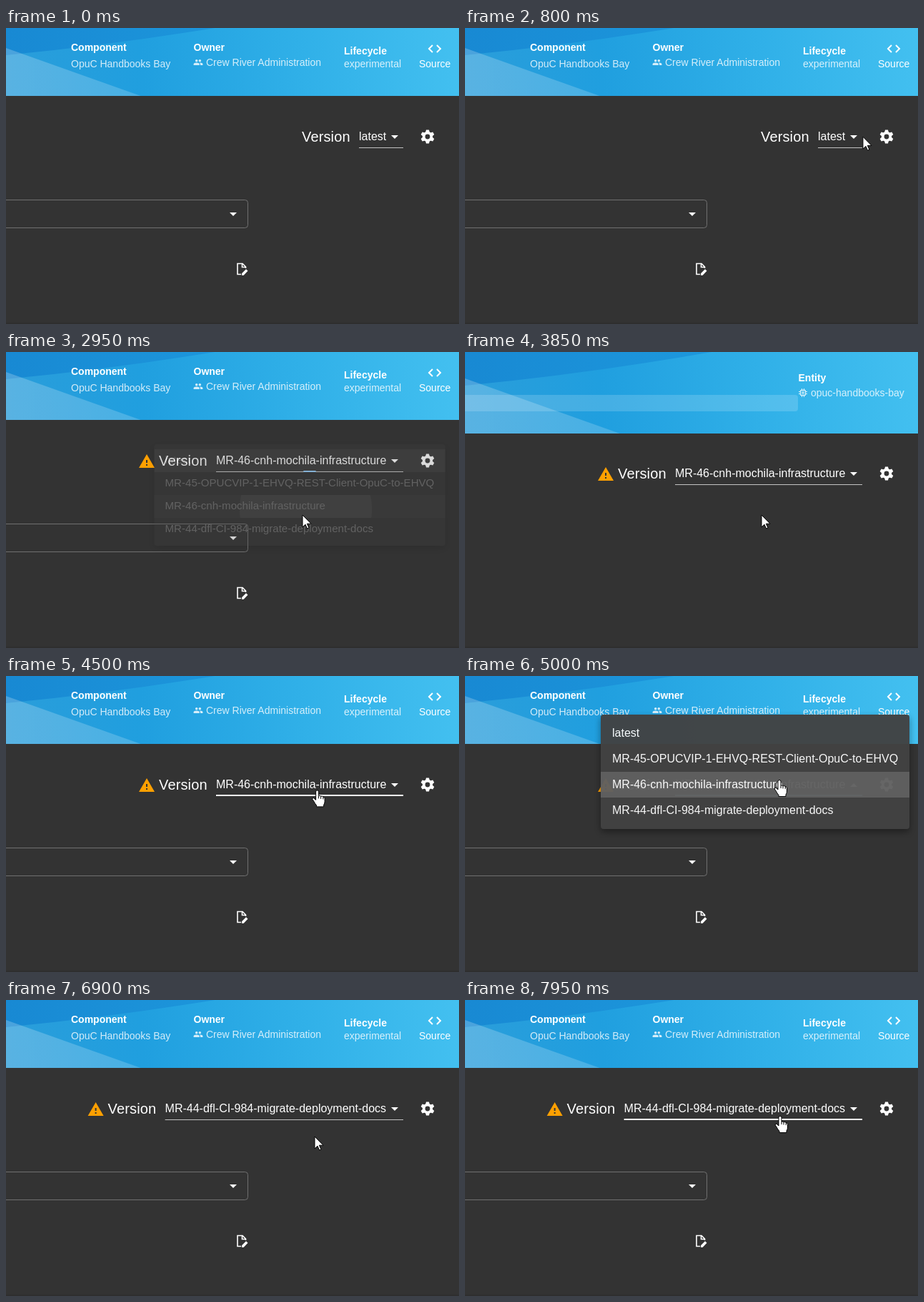
An HTML page for the animation above (8000 ms loop, 634x414 px).

```html
<!DOCTYPE html>
<html lang="en">
<head>
<meta charset="utf-8">
<title>Version selector</title>
<style>
  html, body { margin: 0; width: 100%; height: 100%; overflow: hidden; background: #333; }
  svg { display: block; width: 634px; height: 414px; }
  text { font: 14px "Liberation Sans", sans-serif; fill: #fff; white-space: pre; }
  .label { font-weight: bold; }
  .soft { opacity: .8; }
  .version { font-size: 20px; letter-spacing: .15px; }
  .item { font-size: 16px; }
  .paper { filter: drop-shadow(0 4px 5px rgba(0, 0, 0, .4)); }
</style>
</head>
<body>
<svg viewBox="0 0 634 414">
  <defs>
    <linearGradient id="deep"><stop stop-color="#1889d3"/><stop offset="1" stop-color="#22a5e5"/></linearGradient>
    <linearGradient id="wave" gradientUnits="userSpaceOnUse" x1="0" y1="60" x2="634" y2="10">
      <stop stop-color="#2a9dda"/><stop offset=".3" stop-color="#209fdf"/>
      <stop offset=".65" stop-color="#30b0e8"/><stop offset="1" stop-color="#43c0f0"/>
    </linearGradient>
    <linearGradient id="slope"><stop stop-color="#fff" stop-opacity=".22"/><stop offset="1" stop-color="#fff" stop-opacity=".16"/></linearGradient>
    <clipPath id="rowClip"><rect id="rowBox" x="190" width="432" height="36"/></clipPath>
    <path id="caret" d="M-5-2.5H5L0 2.5Z" fill="#fff"/>
  </defs>

  <rect width="634" height="120" fill="url(#deep)"/>
  <g id="waves">
    <path d="M0 38Q172 21.5 345-9H634V130H0Z" fill="url(#wave)"/>
    <path d="M0 28L281 128H0Z" fill="url(#slope)"/>
  </g>

  <g id="fullHeader">
    <text class="label" x="91" y="32">Component</text>
    <text class="soft" x="91" y="55">OpuC Handbooks Bay</text>
    <text class="label" x="262.5" y="32">Owner</text>
    <g class="soft" fill="#fff" transform="translate(262 41) scale(.583)">
      <circle cx="8" cy="8" r="3"/><circle cx="16" cy="8" r="3"/>
      <path d="M1 19V16.5Q1 13 8 13T15 16.5V19ZM16 13Q23 13 23 16.5V19H17V16.5Q17 14.6 15 13Z"/>
    </g>
    <text class="soft" x="280" y="53">Crew River Administration</text>
    <text class="label" x="473" y="37">Lifecycle</text>
    <text class="soft" x="473" y="55">experimental</text>
    <path d="M597 24L592 29L597 34M603 24L608 29L603 34" fill="none" stroke="#fff" stroke-width="2"/>
    <text x="578" y="55">Source</text>
  </g>

  <g id="loadHeader">
    <rect x="-8" y="60" width="474" height="23" rx="4" fill="#fff" opacity=".16"/>
    <text class="label" x="466.500" y="41">Entity</text>
    <g class="soft" fill="none" stroke="#fff">
      <rect x="469.500" y="53.500" width="7" height="7" rx="1" stroke-width="1.300"/>
      <rect x="472" y="56" width="2" height="2"/>
      <path d="M471.500 51V53M474.500 51V53M471.500 61V63M474.500 61V63M467 55.500H469M467 58.500H469M477 55.500H479M477 58.500H479"/>
    </g>
    <text class="soft" x="484" y="62">opuc-handbooks-bay</text>
  </g>

  <rect id="body" width="634" height="414" fill="#333"/>
  <rect y="412" width="634" height="2" fill="#2e2e2e"/>

  <g id="docs">
    <rect x="-10" y="240.500" width="348.500" height="39" rx="4" fill="none" stroke="#707070"/>
    <use href="#caret" x="318" y="260.500"/>
    <path d="M329 344.500H324V329.500H331L335.500 334V336M330.500 329.500V334.500H335" fill="none" stroke="#fff" stroke-width="1.600"/>
    <path d="M330 346V343.300L336 337.300L338.500 339.800L332.500 346Z" fill="#fff"/>
  </g>

  <g id="toolbar">
    <g id="picker">
      <path id="warning" d="M-108 162H-86L-97 143ZM-96 159H-98V157H-96ZM-96 155H-98V151H-96Z" fill="#ffa000" fill-rule="evenodd"/>
      <text class="version" x="-80" y="159">Version</text>
      <text class="item" id="value" y="157"></text>
    </g>
    <g id="arrow"><use href="#caret"/></g>
    <rect id="line" fill="#fff"/>
    <rect id="focusLine" y="166" height="2" fill="#90caf9"/>
    <g id="gear" transform="translate(590 152)" fill="#fff">
      <circle r="5.300" fill="none" stroke="#fff" stroke-width="3.800"/>
    </g>
  </g>

  <g id="menu">
    <rect class="paper" x="190" width="432" height="160" rx="4" fill="#424242" id="paper"/>
    <rect id="chosenRow" x="190" width="432" height="36" fill="#fff" opacity=".16"/>
    <rect id="hoverRow" x="190" width="432" height="36" fill="#fff" opacity=".08"/>
    <g clip-path="url(#rowClip)"><circle id="ripple" fill="#fff"/></g>
    <g id="items"></g>
  </g>

  <g id="cursor" fill="#fff" stroke="#000" stroke-linejoin="round">
    <path id="pointer" d="M0 0V17L4 13.200L6.600 19L9 18L6.400 12.200H12Z"/>
    <g id="hand">
      <path d="M-2 1.500Q-2-.5 0-.5T2 1.500V7.500Q3 6.500 4.500 7.200L5 8Q6.500 7 8 8.200L8.300 9Q10 8.500 10.500 10.500V15Q10.500 18 9 20V22.500H-1V20.500Q-3 18.500-5 14.500L-6.800 12Q-7.200 10-5 10.200L-2 13Z"/>
      <path d="M2 7.500V11M5 8V11.500M8.300 9V12" fill="none"/>
    </g>
  </g>
</svg>

<script>
const LOOP = 8000, STEP = 50;
const FADE = 267, SHAPE = 178, DELAY = 89;

const versions = [
  'latest',
  'MR-45-OPUCVIP-1-EHVQ-REST-Client-OpuC-to-EHVQ',
  'MR-46-cnh-mochila-infrastructure',
  'MR-44-dfl-CI-984-migrate-deployment-docs'
];
const selections = [
  { from: 0, item: 0, x: 494 },
  { from: 2817, item: 2, x: 294 },
  { from: 6067, item: 3, x: 222.6 }
];
const menus = [
  { open: 1445, close: 2817, y: 126, originX: 494, chosen: 0 },
  { open: 4800, close: 6067, y: 54, originX: 294, chosen: 2 }
];
const loading = [[3350, 3900], [6550, 6850]];
const focus = [[1445, 2817], [2920, 3350], [4800, 6550]];
const path = [
  [50, 640, 169], [850, 556, 152], [1000, 541, 146], [1700, 541, 146],
  [2500, 415, 228], [3950, 415, 228], [4700, 440, 146], [5150, 440, 146],
  [5850, 432, 191], [7600, 432, 191], [7900, 441, 163], [LOOP, 441, 163]
];

const el = {};
document.querySelectorAll('[id]').forEach(node => el[node.id] = node);
const set = (node, attrs) => Object.entries(attrs).forEach(([k, v]) => node.setAttribute(k, v));
const show = (node, on) => node.style.display = on ? '' : 'none';
const clamp = v => Math.min(1, Math.max(0, v));
const active = (spans, t) => spans.find(([a, b]) => t >= a && t < b);

// cubic-bezier(.4, 0, .2, 1)
function ease(progress) {
  const x = clamp(progress);
  let lo = 0, hi = 1;
  for (let i = 0; i < 20; i++) {
    const s = (lo + hi) / 2, r = 1 - s;
    if (1.2 * r * r * s + .6 * r * s * s + s ** 3 < x) lo = s; else hi = s;
  }
  return 3 * (1 - lo) * lo * lo + lo ** 3;
}

function cursorAt(t) {
  const next = path.findIndex(p => p[0] > t);
  if (next < 1) return path[0].slice(1);
  const [t0, x0, y0] = path[next - 1], [t1, x1, y1] = path[next];
  const p = (t - t0) / (t1 - t0), s = p * p * (3 - 2 * p);
  return [x0 + (x1 - x0) * s, y0 + (y1 - y0) * s];
}

function drawMenu(menu, t, x, y) {
  show(el.menu, menu);
  if (!menu) return;
  const closing = t >= menu.close;
  const alpha = closing ? 1 - ease((t - menu.close) / FADE) : ease((t - menu.open) / FADE);
  const grown = closing ? 1 - ease((t - menu.close - DELAY) / SHAPE) : ease((t - menu.open) / SHAPE);
  const scale = .75 + .25 * grown;
  const rowY = i => menu.y + 8 + 36 * i;
  const hover = Math.floor((y - menu.y - 8) / 36);

  set(el.menu, {
    opacity: alpha,
    transform: `translate(${menu.originX} 152) scale(${scale} ${scale * scale}) translate(${-menu.originX} -152)`
  });
  set(el.paper, { y: menu.y });
  set(el.chosenRow, { y: rowY(menu.chosen) });
  set(el.hoverRow, { y: rowY(hover) });
  show(el.hoverRow, hover !== menu.chosen);
  set(el.items, { transform: `translate(206 ${menu.y + 31})` });

  const age = (t - menu.close + 70) / 550;
  show(el.ripple, age > 0);
  set(el.rowBox, { y: rowY(hover) });
  set(el.ripple, { cx: x, cy: y, r: 180 * ease(age), opacity: .25 * (1 - clamp(age)) });
}

function draw(t) {
  const busy = active(loading, t);
  const menu = menus.find(m => t >= m.open && t < m.close + FADE);
  const open = menu && t < menu.close;
  const { item, x: left } = selections.findLast(s => t >= s.from);
  const [x, y] = cursorAt(t);
  const overPicker = !busy && x >= left && x < 556 && y >= 136 && y < 168;

  set(el.waves, { transform: `translate(0 ${busy ? 9 : 0})` });
  set(el.body, { y: busy ? 114 : 95 });
  show(el.fullHeader, !busy);
  show(el.docs, !busy);
  show(el.loadHeader, busy);

  set(el.toolbar, { transform: `translate(0 ${busy ? 18 : 0})` });
  set(el.picker, { transform: `translate(${left} 0)` });
  show(el.warning, item > 0);
  el.value.textContent = versions[item];
  set(el.arrow, { transform: `translate(544 152.500) rotate(${open ? 180 : 0})` });
  const thick = overPicker && !menu;
  set(el.line, { x: left, width: 556 - left, y: thick ? 166 : 167, height: thick ? 2 : 1, opacity: thick ? 1 : .7 });
  const focused = active(focus, t);
  const width = focused ? (556 - left) * ease((t - focused[0]) / 200) : 0;
  set(el.focusLine, { x: (556 + left - width) / 2, width });

  drawMenu(menu, t, x, y);

  const hand = overPicker || open || (t >= 6067 && t < 6550);
  show(el.cursor, t > 50);
  show(el.hand, hand);
  show(el.pointer, !hand);
  set(el.cursor, { transform: `translate(${x} ${y})` });
}

el.items.innerHTML = versions.map((v, i) => `<text class="item" y="${36 * i}">${v}</text>`).join('');
el.gear.innerHTML += [0, 60, 120, 180, 240, 300]
  .map(a => `<path d="M-2-9.600H2L3-5.500H-3Z" transform="rotate(${a})"/>`).join('');

const start = performance.now();
function tick() {
  const t = (performance.now() - start) % LOOP;
  draw(Math.floor(t / STEP) * STEP);
  requestAnimationFrame(tick);
}
tick();
</script>
</body>
</html>
```
